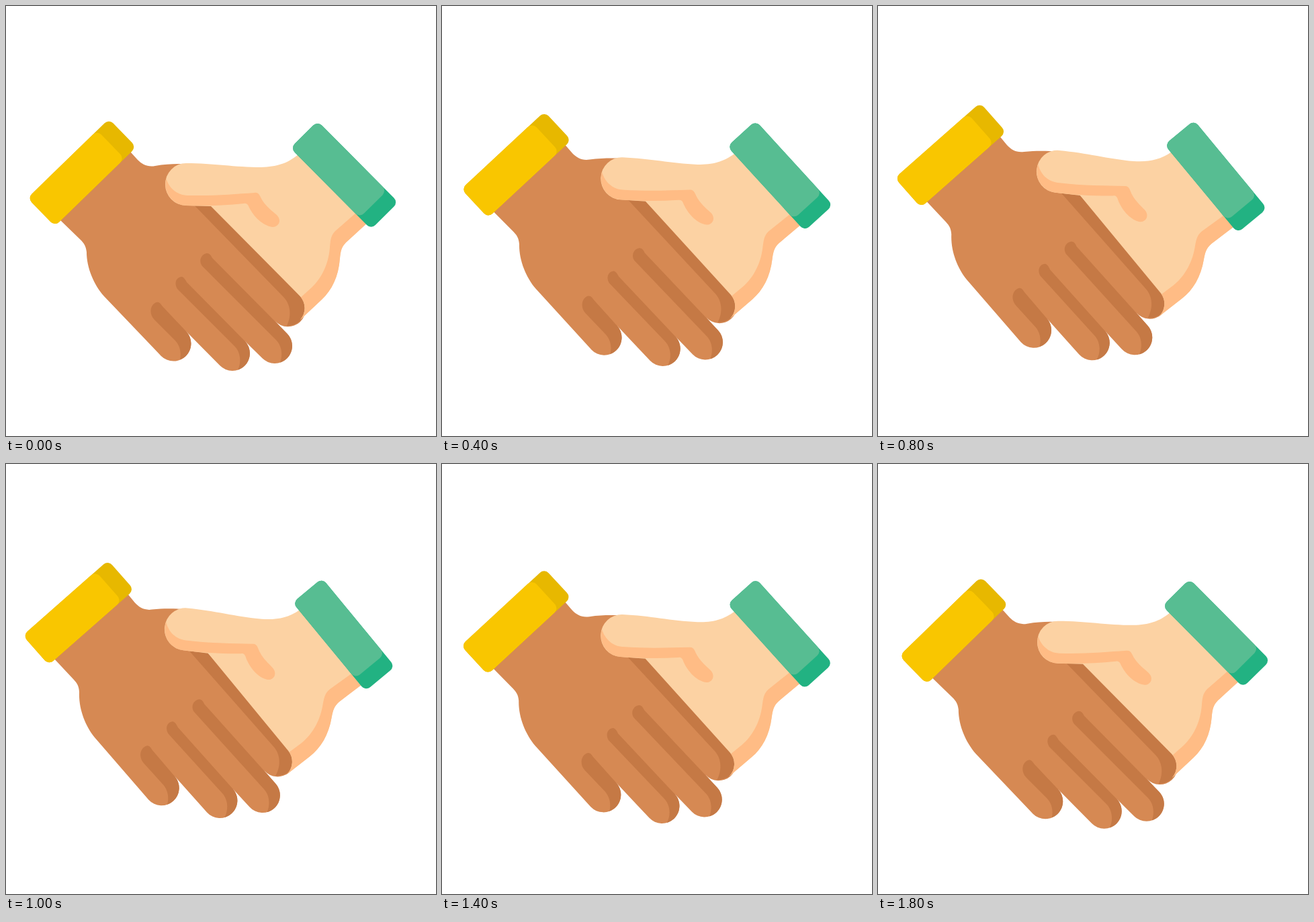
An HTML page that plays this animation: 640 px wide and 640 px high, repeating every 1.9 s.

```html
<!DOCTYPE html>
<html lang="en">
<head>
<meta charset="utf-8">
<title>Handshake</title>
<style>
  html, body { margin: 0; width: 100%; height: 100%; overflow: hidden; background: #fff; }
  svg { display: block; width: 100vw; height: 100vh; }
  .brown { fill: #d68953; }
  .brown-dark { fill: #c57945; }
  .peach { fill: #fcd2a3; }
  .peach-dark { fill: #ffbc85; }
</style>
</head>
<body>
<svg viewBox="0 0 640 640" xmlns="http://www.w3.org/2000/svg">
  <g id="left">
    <path class="brown" d="M150 200 L186 218 L196 229 C203 236 211 240 222 238 C240 235 255 235 270 235
      L320 255 L307 297 L439 433 A26 26 0 0 1 400.6 469
      L418.4 487.6 A26 26 0 0 1 381.6 524.4
      L355.4 498.6 A26 26 0 0 1 318.6 535.4
      L267.9 484.1 A26 26 0 0 1 231 521
      L146 432 C131 415 120 390 120 366 C119 357 116 353 111 348 L78 316 Z"/>
    <!-- finger shadows: index, middle, ring, little -->
    <path class="brown-dark" d="M269 285 L413 433 C423 443 426 460 418 476 A26 26 0 0 0 439 433 L300 290 Z"/>
    <path class="brown-dark" d="M292 387 C286 379 291 369 299 368 C303 368 305 371 307 375
      L418.4 487.6 A26 26 0 0 1 408 530.8 C412 520 411 506 402 497 Z"/>
    <path class="brown-dark" d="M255 421 C249 411 255 403 262 403 C265 404 267 407 269 411
      L355.4 498.6 A26 26 0 0 1 345 541.8 C351 530 349 515 340 506 Z"/>
    <path class="brown-dark" d="M221 467 C212 458 215 444 224 441 C228 440 230 443 233 447
      L267.9 484.1 A26 26 0 0 1 259 526.7 C261 518 260 507 252 498 Z"/>
    <g transform="translate(113 248) rotate(-44.2)">
      <rect x="-84.6" y="-29.2" width="169.2" height="58.4" rx="9" fill="#e7b800"/>
      <rect x="-84.6" y="-29.2" width="144.6" height="58.4" rx="9" fill="#f9c600"/>
    </g>
  </g>
  <g id="right">
    <path class="peach" d="M268 234 C310 234 340 240 380 240 C403 239 418 235 435 221 L480 230 L537 323
      L506 352 C499 359 498 366 497 376 C495 403 485 423 470 437
      L438 467 A26 26 0 0 0 437.4 431.6 L305 298 L268 297 A31 31.5 0 0 1 268 234 Z"/>
    <path class="peach-dark" d="M522 307 L490 335 C483 342 483 350 482 360 C480 385 469 406 455 419
      L439 433.4 A26 26 0 0 1 438 467 L470 437 C485 423 495 403 497 376 C498 366 499 359 506 352 L540 321 Z"/>
    <path class="peach-dark" d="M238.5 257 C243 272 256 282 270 282 C310 283 340 280 370 278
      C377 277 378 284 382 290 C388 299 395 304 403 311 C411 319 406 329 397 329
      C381 327 368 312 362 300 C360 295 358 293 354 294 C325 297 295 298 268 297
      A31 31.5 0 0 1 238.5 257 Z"/>
    <g transform="translate(503.6 251.8) rotate(45.2)">
      <rect x="-85.2" y="-28.5" width="170.4" height="57" rx="9" fill="#22b282"/>
      <rect x="-85.2" y="-28.5" width="146.2" height="57" rx="9" fill="#57bd92"/>
    </g>
  </g>
</svg>
<script>
  const LOOP = 1900, STEP = 100, SWING = 1920, LEAD = 40;
  const hands = [
    { el: document.getElementById('left'), angle: 2.87, pivot: '654 130' },
    { el: document.getElementById('right'), angle: 5.4, pivot: '479.5 244' }
  ];

  function draw(ms) {
    const t = Math.floor((ms % LOOP) / STEP) * STEP;
    const lift = (1 - Math.cos(2 * Math.PI * (t + LEAD) / SWING)) / 2;
    for (const { el, angle, pivot } of hands) {
      el.setAttribute('transform', `rotate(${(angle * lift).toFixed(4)} ${pivot})`);
    }
  }

  const start = performance.now();
  function tick() {
    draw(performance.now() - start);
    requestAnimationFrame(tick);
  }
  tick();
</script>
</body>
</html>
```
